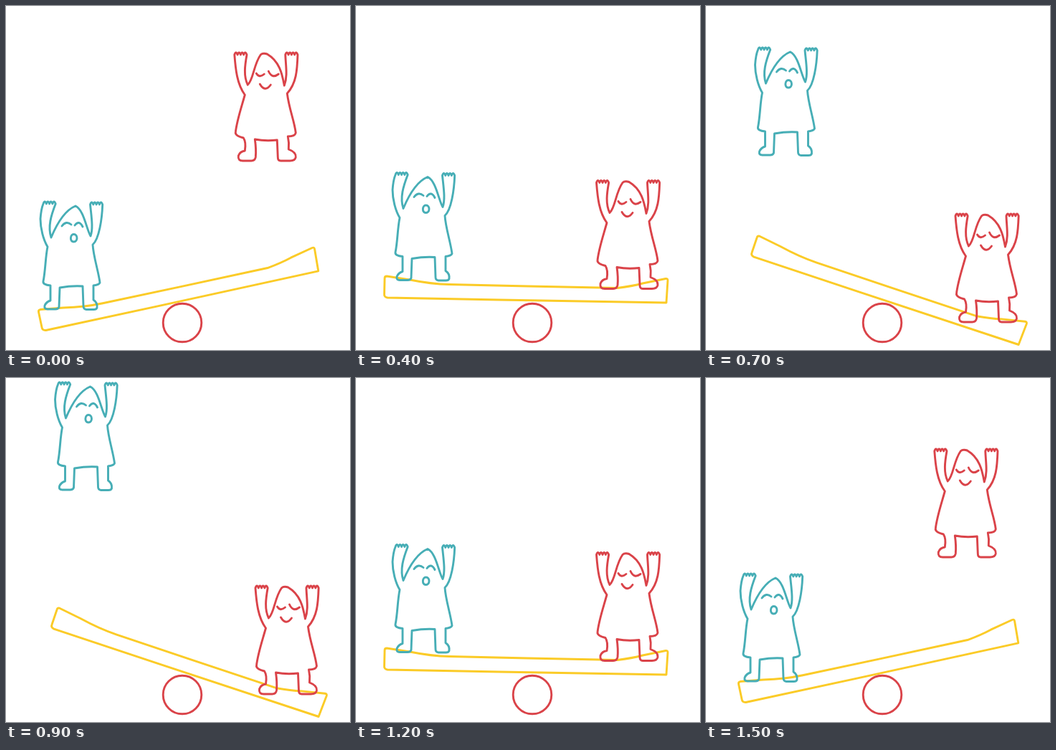
These frames come from a looping animation (480 px wide and 480 px high, 1.6 s). An HTML page:

```html
<!DOCTYPE html>
<html lang="en">
<head>
<meta charset="utf-8">
<title>Seesaw</title>
<style>
  html, body { margin: 0; height: 100%; overflow: hidden; background: #fff; }
  svg { display: block; width: 100vw; height: 100vh; }
  svg * { fill: none; stroke-width: 2.9; stroke-linecap: round; stroke-linejoin: round; }
  .yellow { stroke: #fbcb27; }
  .red { stroke: #da4349; }
  .teal { stroke: #47aeb6; }
</style>
</head>
<body>
<svg viewBox="0 0 480 480">
  <path id="beam" class="yellow" d="M43 377L75 382Q105 388 130 388.500L240 391L365 393.500Q385 391 400 387L432 380.500Q435 380 435 383L433 414L200 410L44 407Q39 406 39.500 402L40 380Q40 377 43 377Z"/>
  <circle class="red" cx="246" cy="442" r="26.8"/>
  <path id="teal" class="teal"/>
  <path id="red" class="red"/>
</svg>
<script>
const STEP = 100, STEPS = 16;
const PIVOT = "236.75 395";
const fingers = "q2-6 4.3 0".repeat(4);

// Outlines: arms and hood, dress and legs, face
const outlines = {
  teal: `M58 336C52 326 48 310 48 297Q49 283 52 276${fingers}C63 292 58 308 63 323
    C68 311 80 286 97 279C109 285 112 311 118 321C122 310 119 293 117.500 277${fingers}C134 297 130 325 121 333
    C122 350 129 370 131 386Q130 389 122 390V410Q128 414 127 421Q126 424 121 423.500H112Q108 423 108 419
    L107 391Q92 390 75 393L74 420Q73 423 69 423H58Q53 423 54 418Q56 413 62 411V390Q51 389 52 384C55 370 55 350 58 336
    M78 307Q84 299 91 305M96 306Q102 298 107 308
    M94.500 318.500c6 0 6 10.500 0 10.500s-5-10.500 0-10.500`,
  red: `M333 124C322 109 320 88 318.500 68${fingers}C333 83 331 98 337 110
    C345 103 345 82 355 68Q358 65 364 67C381 77 385 94 388 111C393 98 390 83 389.500 68${fingers}C406 89 405 108 392 122
    C395 145 402 160 404 177Q403 182 393 182Q395 191 394 200Q405 204 404 211Q403 216 396 216H383Q379 216 379 211
    L378 187Q362 189 347 186Q349 200 348 211Q347 216 342 216H330Q323 216 324 209Q326 203 333 202
    Q335 190 331 184Q319 181 320 176C322 159 328 142 333 124
    M349 94Q353 101 360 95M366 91Q371 102 380 95M354 109Q361 121 369 110`
};

const $ = id => document.getElementById(id);
for (const id in outlines) $(id).setAttribute("d", outlines[id]);

// Distance below the top of a jump: steady rise until `up`, steady fall after `down`
const drop = (step, rise, up, down, fall) =>
  Math.max(0, rise * (up - step), fall * (step - down));

const place = (id, x, y, turn = 0) =>
  $(id).setAttribute("transform", `translate(${x} ${y}) rotate(${turn} ${PIVOT})`);

function draw(now) {
  const step = Math.floor(now / STEP) % STEPS;
  if (step % 8 === 4) {
    place("beam", 0, 0);
    place("teal", 3, -40.5);
    place("red", 17, 178.5);
  } else if (step > 4 && step < 12) {
    place("beam", 17.7, 1, 17.3);
    place("teal", 20.5, drop(step, 52, 8, 9, 76.2) - 267);
    place("red", 29.5, 225);
  } else {
    const air = step < 4 ? step + STEPS : step;
    place("beam", 3.7, 1.5, -13.3);
    place("teal", 0, 0);
    place("red", 0.3, drop(air, 42.5, 15.8, 16, 42.5));
  }
}

const start = performance.now();
function tick() {
  draw(performance.now() - start);
  requestAnimationFrame(tick);
}
tick();
</script>
</body>
</html>
```
